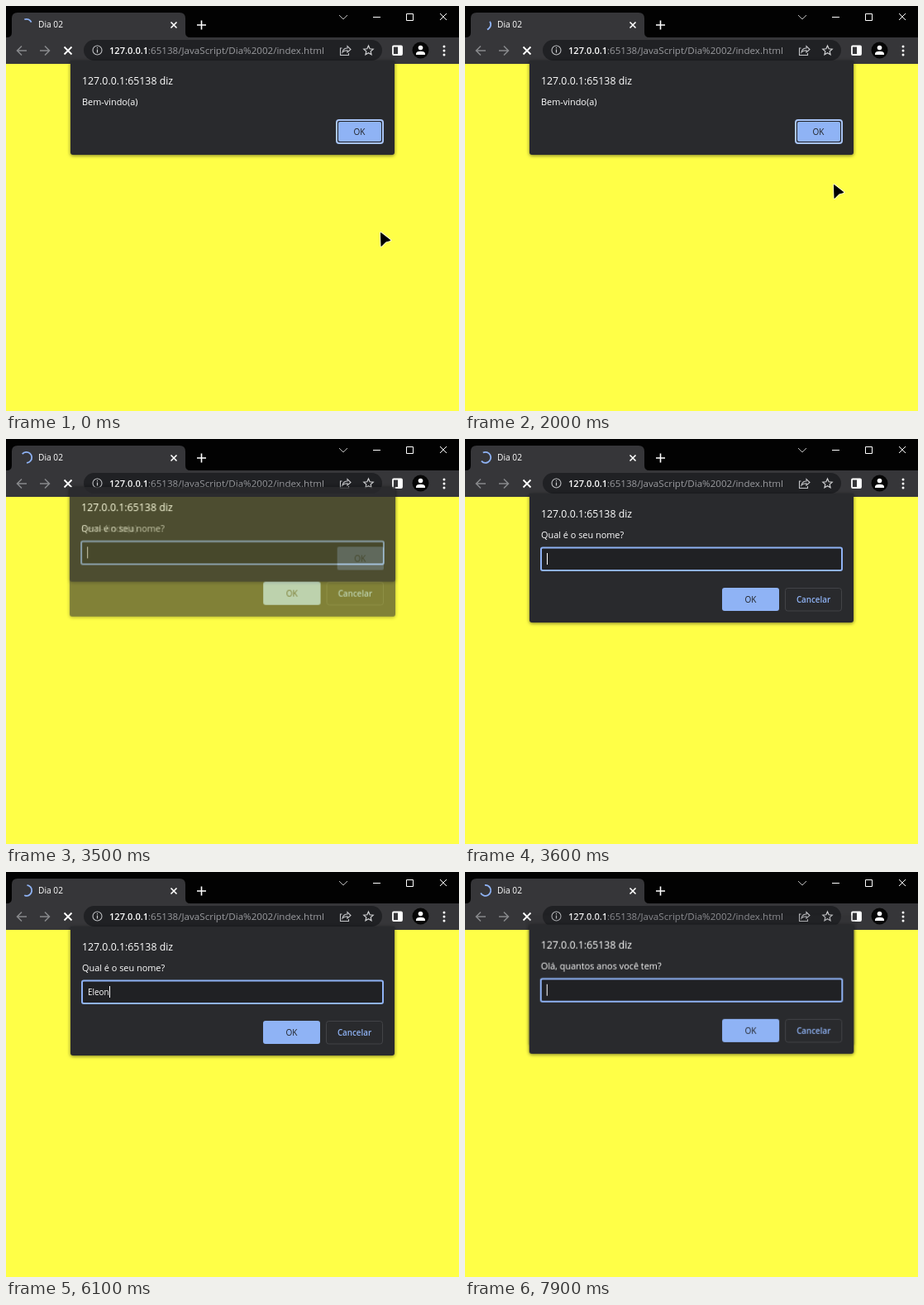
An HTML page with a canvas that plays this animation: 548 px wide and 490 px high, repeating every 8 s.

```html
<!DOCTYPE html>
<html lang="pt">
<meta charset="utf-8">
<title>Dia 02</title>
<style>
html, body { margin: 0; width: 548px; height: 490px; overflow: hidden; background: #ffff47 }
canvas { display: block }
</style>
<canvas id="stage" width="548" height="490"></canvas>
<script>
const W = 548, H = 490, LOOP = 8000, STEP = 100, NAME = 'Eleonor';
const BLUE = '#8fb3f5', DARK = '#202124', PANEL = '#292a2d', BAR = '#363639', WHITE = '#fff', GRAY = '#9a9b9f';
const KEY_TIMES = [4400, 4800, 5200, 5600, 6000, 6500, 6900];
// time, x, y of the pointer tip
const POINTER = [[0, 453, 274], [400, 464, 286], [900, 443, 200], [1400, 426, 176],
  [1800, 439, 199], [2000, 446, 216], [2300, 446, 215], [2700, 430, 160], [3300, 427, 153]];

const stage = document.getElementById('stage').getContext('2d');
const layer = document.createElement('canvas');
layer.width = W;
layer.height = H;
let g = stage;

const clamp = v => Math.max(0, Math.min(1, v));

function text(s, x, y, size, color = WHITE, weight = 400, align = 'left') {
  g.font = `${weight} ${size}px "Open Sans", "Noto Sans", sans-serif`;
  g.textAlign = align;
  g.fillStyle = color;
  g.fillText(s, x, y);
}

function box(x, y, w, h, r, fill, stroke, width = 1) {
  g.beginPath();
  g.roundRect(x, y, w, h, r);
  if (fill) { g.fillStyle = fill; g.fill(); }
  if (stroke) { g.strokeStyle = stroke; g.lineWidth = width; g.stroke(); }
}

function line(path, color = WHITE, width = 1.5) {
  g.strokeStyle = color;
  g.lineWidth = width;
  g.stroke(new Path2D(path));
}

function dot(x, y, r, color) {
  g.fillStyle = color;
  g.beginPath();
  g.arc(x, y, r, 0, 7);
  g.fill();
}

function drawBrowser() {
  g.fillStyle = '#ffff47';
  g.fillRect(0, 0, W, H);
  g.fillStyle = '#020202';
  g.fillRect(0, 0, W, 38);
  g.fillStyle = BAR;
  g.fillRect(0, 38, W, 32);
  g.fill(new Path2D('M1 38Q7 38 7 32V15Q7 8 14 8H210Q217 8 217 15V32Q217 38 223 38Z'));
  text('Dia 02', 39, 26, 10.2);
  line('M199.5 19.5l7 7m0-7l-7 7M231 23h11M236.5 17.5v11', WHITE, 1.6);
  line('M403 11l5 5 5-5', '#b8b8b8', 1);
  line('M444 13.5h9M484.5 9.5h8v8h-8zM525 9l8 8m0-8l-8 8', WHITE, 1);

  line('M25 54H14m5-5.5L13.5 54l5.5 5.5M41 54h11m-5-5.5l5.5 5.5-5.5 5.5', '#88898c', 1.5);
  line('M70.5 49.5l9 9m0-9l-9 9', WHITE, 1.8);
  box(94, 41, 361, 25, 12.5, DARK);
  g.strokeStyle = '#bfc0c3';
  g.lineWidth = 1.1;
  g.beginPath();
  g.arc(110.5, 53.5, 5.5, 0, 7);
  g.stroke();
  line('M110.5 52.5v4M110.5 50v1.3', '#d0d1d3', 1.2);
  text('127.0.0.1', 125, 57.5, 11.1, WHITE, 600);
  text(':65138/JavaScript/Dia%2002/index.html', 172, 57.5, 11.6, GRAY);
  line('M406.5 51H404.5V59.5H414.5V57M407 56Q408 51 413 51V48.5L417 52.5 413 56V53.7Q409 53.7 407 56Z', '#c4c5c8', 1.1);

  let star = '';
  for (let i = 0; i < 10; i++) {
    const a = i * Math.PI / 5 - Math.PI / 2, r = i % 2 ? 2.8 : 6;
    star += `${i ? 'L' : 'M'}${438.5 + r * Math.cos(a)} ${54 + r * Math.sin(a)}`;
  }
  line(star + 'Z', '#d0d1d3', 1.2);
  box(468, 48.5, 11, 10.5, 1, null, WHITE, 1.8);
  g.fillStyle = WHITE;
  g.fillRect(474, 48.5, 5, 10.5);
  dot(501.5, 53.5, 10, '#060606');
  dot(501.5, 50.5, 2.8, WHITE);
  g.fill(new Path2D('M496 59V58Q496 54.7 501.5 54.7T507 58V59Z'));
  for (const y of [49, 54, 59]) dot(530, y, 1.5, WHITE);
}

// cubic-bezier(.4, 0, .2, 1)
function ease(x) {
  let lo = 0, hi = 1;
  for (let i = 0; i < 20; i++) {
    const s = (lo + hi) / 2, r = 1 - s;
    if (1.2 * s * r * r + .6 * s * s * r + s ** 3 < x) lo = s; else hi = s;
  }
  return lo * lo * (3 - 2 * lo);
}

// The arc alternately shrinks and grows while it turns.
function drawSpinner(t) {
  const e = t + 203 + 85 * clamp(1 - t / 2000), half = 666;
  const growing = Math.floor(e / half) % 2;
  const size = 270 * ease(e % half / half);
  const sweep = growing ? Math.max(5, size) : Math.min(-5, size - 270);
  const start = 270 + 360 * e / 1568 + 270 * (Math.floor(e / half / 2) % 4);
  const rad = Math.PI / 180;
  g.strokeStyle = BLUE;
  g.lineWidth = 1.8;
  g.beginPath();
  g.arc(24.7, 22.3, 6.5, start * rad, (start + sweep) * rad, sweep < 0);
  g.stroke();
}

function panel(height, message) {
  g.save();
  g.shadowColor = 'rgba(0,0,0,.55)';
  g.shadowBlur = 4;
  g.shadowOffsetY = 1;
  box(78, 66, 392, height, [0, 0, 3, 3], PANEL);
  g.restore();
  text('127.0.0.1:65138 diz', 92, 95, 12.3);
  text(message, 92, 119.5, 10.9);
}

function drawAlert(focused) {
  panel(114, 'Bem-vindo(a)');
  if (focused) box(400, 138, 56, 28, 3, DARK, '#a9c5f8', 2);
  const edge = focused ? 2 : 0;
  box(400 + edge, 138 + edge, 56 - 2 * edge, 28 - 2 * edge, 2, BLUE);
  text('OK', 427.5, 156, 10, DARK, 400, 'center');
}

function drawPrompt(message, value, caret) {
  panel(156, message);
  box(92, 131.5, 364, 27.5, 2, DARK, BLUE, 2);
  text(value, 99, 148.5, 9.9);
  if (caret) {
    g.fillStyle = WHITE;
    g.fillRect(99 + Math.round(g.measureText(value).width), 138, 1, 14);
  }
  box(311, 180, 69, 28, 3, BLUE);
  text('OK', 345.5, 198, 10, DARK, 400, 'center');
  box(387.5, 180.5, 68, 27.5, 3, null, '#424347');
  text('Cancelar', 421.5, 198, 9.8, BLUE, 600, 'center');
}

// A partly shown dialog is see-through, sits higher and is slightly larger.
function fade(shown, draw) {
  if (shown <= 0) return;
  if (shown >= 1) return draw();
  g = layer.getContext('2d');
  g.clearRect(0, 0, W, H);
  draw();
  g = stage;
  const hidden = 1 - shown, scale = 1 + .01 * hidden;
  g.save();
  g.globalAlpha = Math.min(1, shown * 1.18);
  g.translate(W / 2, 66 - 16 * hidden);
  g.scale(scale, scale);
  g.drawImage(layer, -W / 2, -66);
  g.restore();
}

function drawPointer(t) {
  const i = POINTER.findIndex(p => p[0] > t);
  if (i < 0) return;
  const [t0, x0, y0] = POINTER[i - 1], [t1, x1, y1] = POINTER[i];
  const k = (t - t0) / (t1 - t0);
  g.save();
  g.translate(x0 + (x1 - x0) * k, y0 + (y1 - y0) * k);
  g.lineJoin = 'round';
  const arrow = new Path2D('M.5 .5L12 9.5 6.5 11 1 16.5Z');
  g.strokeStyle = 'rgba(255,255,235,.75)';
  g.lineWidth = 3;
  g.stroke(arrow);
  g.fillStyle = g.strokeStyle = '#000';
  g.lineWidth = 1;
  g.fill(arrow);
  g.stroke(arrow);
  g.restore();
}

function render(t) {
  drawBrowser();
  drawSpinner(t);
  const first = clamp((t - 3400) / 200), second = clamp((t - 7730) / 200);
  const typed = KEY_TIMES.filter(k => k <= t).length;
  const lastKey = typed ? KEY_TIMES[typed - 1] : 3500;
  const caret = (t - lastKey) % 1000 < 500;
  fade(1 - first, () => drawAlert(first === 0));
  fade(first * (1 - second), () => drawPrompt('Qual é o seu nome?', NAME.slice(0, typed), caret));
  fade(second, () => drawPrompt('Olá, quantos anos você tem?', '', true));
  drawPointer(t);
}

const begin = performance.now();
function tick() {
  const t = Math.max(0, performance.now() - begin) % LOOP;
  render(Math.floor(t / STEP) * STEP);
  requestAnimationFrame(tick);
}
tick();
</script>
</html>
```
